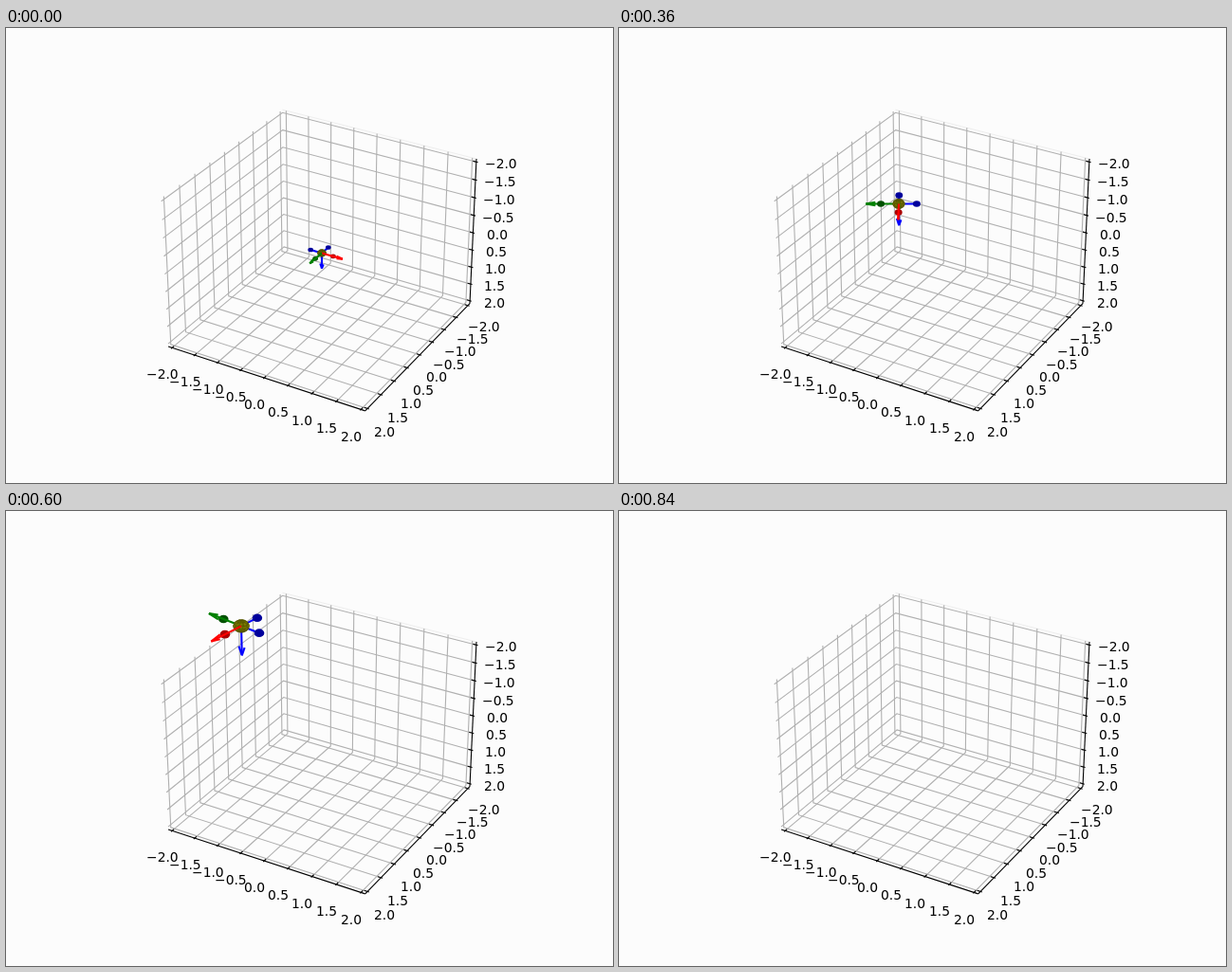
These frames come from a looping animation (640x480 px, 900 ms). An HTML page with a canvas:

```html
<!DOCTYPE html>
<html lang="en">
<head>
<meta charset="utf-8">
<title>Rising quadcopter</title>
<style>
html, body { margin: 0; width: 640px; height: 480px; overflow: hidden; background: #fcfcfc; }
canvas { display: block; }
</style>
</head>
<body>
<canvas id="stage" width="640" height="480"></canvas>
<script>
const ctx = document.getElementById('stage').getContext('2d');
const STEP = 30, LAST = 28, LOOP = 900;
const SCALE = 369.6 / 0.185;
const EDGE = 2 + 1 / 12;          // padded box limit
const LABEL = EDGE + 0.346;       // tick label distance
const ARM = 0.24, ARROW = 0.44;
const TICKS = Array.from({ length: 9 }, (_, i) => i / 2 - 2);

// Perspective camera: elevation 30°, azimuth -60°, y and z axes inverted.
function project([x, y, z]) {
  const a = x * 2 / 7, b = -y * 2 / 7, c = -z * 1.5 / 7;
  const depth = 10 - (0.4330127 * a - 0.75 * b + 0.5 * c);
  return {
    x: 332.994 + SCALE * (0.8660254 * a + 0.5 * b) / depth,
    y: 237.405 - SCALE * (-0.25 * a + 0.4330127 * b + 0.8660254 * c) / depth,
    depth
  };
}

const along = (p, dir, s) => p.map((v, i) => v + dir[i] * s);

function line(color, width, ...points) {
  ctx.beginPath();
  for (const point of points) {
    const p = project(point);
    ctx.lineTo(p.x, p.y);
  }
  ctx.strokeStyle = color;
  ctx.lineWidth = width;
  ctx.stroke();
}

function label(value, point) {
  const text = value.toFixed(1).replace('-', '\u2212');
  const p = project(point);
  ctx.fillText(text, Math.round(p.x - ctx.measureText(text).width / 2), Math.round(p.y + 10.5));
}

function drawBox() {
  const E = EDGE, out = E + 1 / 30, inner = E - 1 / 15;
  const grid = (...points) => line('#b0b0b0', 1.11, ...points);
  const axis = (...points) => line('#000', 1.11, ...points);

  line('#eeeeee', 1, [-E, -E, -E], [E, -E, -E]);
  for (const v of TICKS) {
    grid([v, E, E], [v, -E, E], [v, -E, -E]);
    grid([E, v, E], [-E, v, E], [-E, v, -E]);
    grid([-E, E, v], [-E, -E, v], [E, -E, v]);
  }

  axis([-E, E, E], [E, E, E]);
  axis([E, E, E], [E, -E, E]);
  axis([E, -E, E], [E, -E, -E]);

  ctx.font = '13.89px "DejaVu Sans", sans-serif';
  ctx.fillStyle = '#000';
  for (const v of TICKS) {
    axis([v, out, E], [v, inner, E]);
    axis([out, v, E], [inner, v, E]);
    axis([out, -E, v], [inner, -E, v]);
    label(v, [v, LABEL, LABEL]);
    label(v, [LABEL, v, LABEL]);
    label(v, [LABEL, -LABEL, v]);
  }
}

function sphere(center, radius, color, meshColor) {
  const p = project(center);
  const draw = () => {
    const r = radius * SCALE / p.depth;
    ctx.beginPath();
    ctx.ellipse(p.x, p.y, r * 0.2857, r * 0.2342, 0, 0, 2 * Math.PI);
    ctx.fillStyle = color;
    ctx.fill();
    if (meshColor) mesh(center, radius, meshColor);
  };
  return { near: p.depth - radius * 0.27, draw };
}

function mesh(center, radius, color) {
  const at = (lon, lat) => along(center,
    [Math.cos(lon) * Math.sin(lat), Math.sin(lon) * Math.sin(lat), Math.cos(lat)], radius);
  const ring = Array.from({ length: 21 }, (_, i) => i * Math.PI / 10);
  for (let i = 1; i < 6; i++) {
    line(color, 0.6, ...ring.map(a => at(a, i * Math.PI / 6)));
    line(color, 0.6, ...ring.map(a => at(i * Math.PI / 5, a)));
  }
}

// Barbs open at 15° in the plane of dir and side.
function arrow(start, dir, side, color) {
  const tip = along(start, dir, ARROW);
  const barb = s => along(along(tip, dir, -0.29 * ARROW), side, s * 0.0776 * ARROW);
  const draw = () => {
    line(color, 2.08, start, tip);
    line(color, 2.08, tip, barb(1));
    line(color, 2.08, tip, barb(-1));
  };
  return { near: Math.min(project(start).depth, project(tip).depth), draw };
}

function drawDrone(step) {
  const center = [0.3 * step, 0.6 * step, -0.6 * step];
  const yaw = step * Math.PI / 36;
  const forward = [Math.cos(yaw), Math.sin(yaw), 0];
  const left = [-Math.sin(yaw), Math.cos(yaw), 0];
  const down = [0, 0, 1];
  const motor = (dir, s, color) => sphere(along(center, dir, s * ARM), 0.05, color);

  ctx.save();
  ctx.beginPath();
  ctx.rect(143.2, 57.6, 369.6, 369.6);
  ctx.clip();
  line('#00f', 2.08, center, along(center, forward, -ARM));
  line('#00f', 2.08, center, along(center, left, -ARM));
  [
    sphere(center, 0.08, '#7c7c00', '#525200'),
    motor(forward, 1, '#ac0000'),
    motor(left, 1, '#005000'),
    motor(forward, -1, '#00009c'),
    motor(left, -1, '#00009c'),
    arrow(center, forward, down, '#f00'),
    arrow(center, left, down, '#008000'),
    arrow(center, down, [1, 0, 0], '#00f')
  ].sort((a, b) => b.near - a.near).forEach(part => part.draw());
  ctx.restore();
}

function frame() {
  const step = Math.min(LAST, Math.floor(performance.now() % LOOP / STEP));
  ctx.fillStyle = '#fcfcfc';
  ctx.fillRect(0, 0, 640, 480);
  drawBox();
  drawDrone(step);
  requestAnimationFrame(frame);
}
frame();
</script>
</body>
</html>
```
